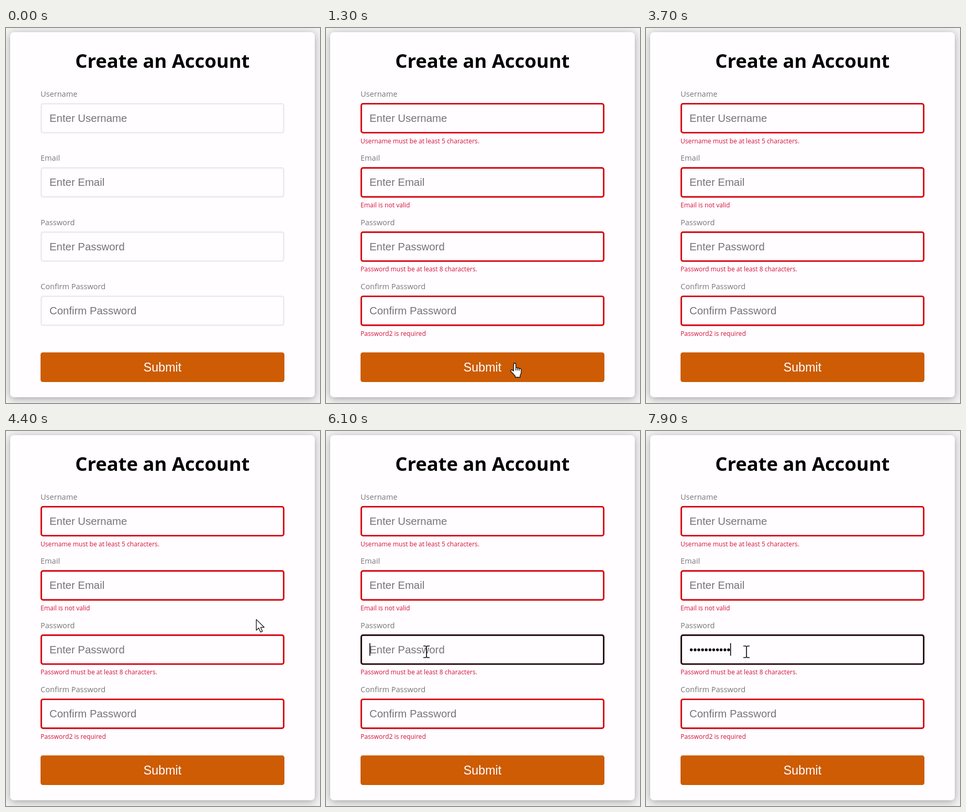
These frames come from a looping animation (600x715 px, 8 s). An HTML page:

```html
<!DOCTYPE html>
<html lang="en">
<head>
<meta charset="utf-8">
<title>Create an Account</title>
<style>
  html, body { margin: 0; width: 100%; height: 100%; overflow: hidden; background: #f3f2f3; }
  .card { position: absolute; left: 8px; top: 8px; width: 582px; height: 696px; border-radius: 7px;
    background: #fffdff; box-shadow: 0 3px 14.5px rgba(0, 0, 0, .32); }
  svg { position: absolute; left: 0; top: 0; }
  text { font-family: "Open Sans", sans-serif; white-space: pre; }
  .title { font-size: 36.4px; font-weight: 700; text-anchor: middle; }
  .label { font-size: 14.55px; fill: #777; }
  .error { font-size: 12.12px; fill: #d4103a; }
  .value { font: 20.37px "Liberation Sans", Arial, sans-serif; }
  .submit { font: 23.28px "Liberation Sans", Arial, sans-serif; fill: #fff; text-anchor: middle; }
  .cursor path { fill: #fff; stroke: #111; stroke-width: 1.3; stroke-linejoin: round; }
  .cursor .beam { fill: none; stroke-width: 1.7; }
</style>
</head>
<body>
<div class="card"></div>
<svg width="600" height="715">
  <text class="title" x="299" y="76">Create an Account</text>
  <g id="fields"></g>
  <rect x="66" y="618.5" width="466" height="56.5" rx="4.5" fill="#cd5c04"/>
  <text class="submit" x="299" y="655">Submit</text>
  <rect id="caret" y="404.5" width="1.6" height="24"/>
  <g id="cursor" class="cursor">
    <path id="arrow" d="M.5 .5V21L5.2 16.7L8.6 24.5L12.2 23L8.8 15.4H15.5Z"/>
    <g id="hand" transform="translate(-8 -1)">
      <path d="M6.5 16V3.2Q6.5 1 8.6 1T10.8 3.2V10Q12.5 8.6 14 10.6Q16 9.6 17.2 11.4Q21 10.8 21 14.5V18Q21 21 19 24V28H9.5V25.5L2 17.5Q0 15 2 14.2T6.5 16Z"/>
      <path d="M10.8 10V15M14 10.6V15M17.2 11.4V15.5"/>
    </g>
    <path id="beam" class="beam" d="M-6-11H-1.5L0-9.5L1.5-11H6M0-9.5V9.5M-6 11H-1.5L0 9.5L1.5 11H6"/>
  </g>
</svg>
<script>
const LOOP = 8000, STEP = 122.4;
const SUBMITTED = 1000, FOCUSED = 5800, TYPING = 6500, KEY_GAP = 115, PASSWORD_LENGTH = 11;
const $ = id => document.getElementById(id);

const fields = [
  ["Username", "Enter Username", "Username must be at least 5 characters."],
  ["Email", "Enter Email", "Email is not valid"],
  ["Password", "Enter Password", "Password must be at least 8 characters."],
  ["Confirm Password", "Confirm Password", "Password2 is required"]
];
$("fields").innerHTML = fields.map(([label, hint, error], i) => `
  <g transform="translate(0 ${i * STEP})">
    <text class="label" x="66" y="131">${label}</text>
    <rect class="box" x="67.4" y="144.4" width="463.2" height="55.2" rx="3.5" fill="#fffdff" stroke-width="2.9"/>
    <text class="value" x="83" y="179" fill="#757575">${hint}</text>
    <text class="error" x="66" y="219.5">${error}</text>
  </g>`).join("");
const boxes = document.querySelectorAll(".box");
const errors = document.querySelectorAll(".error");
const password = document.querySelectorAll(".value")[2];

// Cursor visits: lists of [time, x, y]
const visits = [
  [[100, 398, 722], [700, 360, 639], [3400, 360, 639]],
  [[3900, 360, 639], [4250, 547, 470], [4550, 410, 250], [4850, 36, 130],
   [5050, 131, 139], [5250, 131, 139], [5700, 192, 421], [LOOP, 192, 421]]
];

function cursorAt(t) {
  const path = visits.find(v => t >= v[0][0] && t < v[v.length - 1][0]);
  if (!path) return null;
  const i = path.findIndex(p => p[0] > t);
  const [t0, x0, y0] = path[i - 1], [t1, x1, y1] = path[i];
  const u = (t - t0) / (t1 - t0), k = u * u * (3 - 2 * u);
  return [x0 + (x1 - x0) * k, y0 + (y1 - y0) * k];
}

function cursorShape(x, y) {
  if (x < 66 || x > 532) return "arrow";
  if (y > 618 && y < 675) return "hand";
  const row = (y - 143) / STEP;
  return row >= 0 && row < 4 && row % 1 * STEP < 58 ? "beam" : "arrow";
}

const show = (el, on) => el.style.display = on ? "" : "none";

function render(t) {
  const failed = t >= SUBMITTED, focused = t >= FOCUSED;
  boxes.forEach((box, i) => box.setAttribute("stroke",
    focused && i === 2 ? "#210509" : failed ? "#d6000f" : "#ebebf0"));
  errors.forEach(el => show(el, failed));

  const typed = t < TYPING ? 0 : Math.min(PASSWORD_LENGTH, 1 + Math.floor((t - TYPING) / KEY_GAP));
  password.textContent = typed ? "•".repeat(typed) : fields[2][1];
  password.setAttribute("fill", typed ? "#000" : "#757575");
  show($("caret"), focused && (typed || (t - FOCUSED) % 1000 < 500));
  $("caret").setAttribute("x", 83 + (typed ? password.getComputedTextLength() - .6 : 0));

  const pos = cursorAt(t);
  show($("cursor"), pos);
  if (!pos) return;
  $("cursor").setAttribute("transform", `translate(${pos})`);
  const shape = cursorShape(...pos);
  for (const id of ["arrow", "hand", "beam"]) show($(id), id === shape);
}

const start = performance.now();
function tick() {
  render((performance.now() - start) % LOOP);
  requestAnimationFrame(tick);
}
tick();
</script>
</body>
</html>
```
